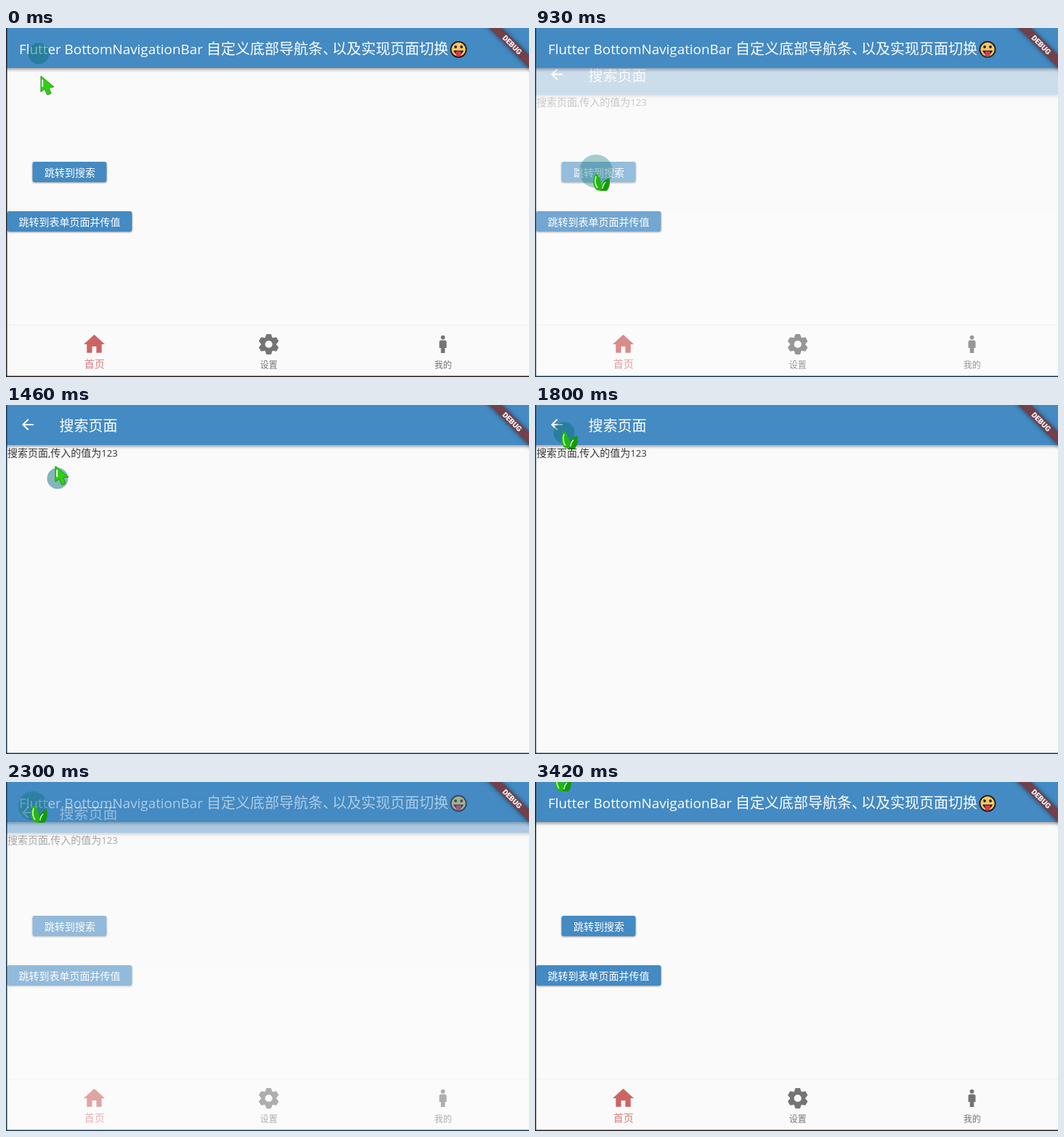
An HTML page that plays this animation: 720x480 px, repeating every 3.59 s.

```html
<!DOCTYPE html>
<html lang="zh-CN">
<head>
<meta charset="utf-8">
<style>
  html, body { margin: 0; width: 100%; height: 100%; overflow: hidden; background: #fafafa; }
  svg { display: block; width: 720px; height: 480px; }
  text { font-family: "Noto Sans CJK SC", "Noto Sans CJK", sans-serif; fill: #fff; white-space: pre; }
  .title { font-size: 20px; font-weight: 300; }
  .body { font-size: 14px; }
  .latin { font: 400 .943em "Open Sans", sans-serif; }
  .small { font-size: 12px; font-weight: 300; }
  .mid { text-anchor: middle; }
  .blue { fill: #448ac3; }
  .bar { filter: drop-shadow(0 2px 2px #0006); }
  .button { filter: drop-shadow(0 1.5px 1px #0006); }
  .gray { fill: #747474; }
  .red { fill: #cd6464; }
</style>
</head>
<body>
<svg viewBox="0 0 720 480">
  <rect width="720" height="480" fill="#fafafa"/>

  <g id="home">
    <rect class="blue bar" x="-9" y="-9" width="738" height="64"/>
    <text class="title" x="18" y="36"><tspan class="latin">Flutter BottomNavigationBar </tspan>自定义底部导航条、</text>
    <text class="title" x="449" y="36">以及实现页面切换</text>
    <g transform="translate(623 29.5)">
      <circle r="10.6" fill="#f8c660" stroke="#1c1c1c" stroke-width="1.8"/>
      <circle cx="-4" cy="-3.5" r="1.9" fill="#222"/>
      <circle cx="4" cy="-3.5" r="1.9" fill="#222"/>
      <path d="M-7 1.5H7Q5 7 0 7T-7 1.5" fill="#33191a"/>
      <path d="M-3.5 2.5h7v4a3.5 3.5 0 0 1-7 0z" fill="#e3344a"/>
    </g>

    <g class="button">
      <rect class="blue" x="36.5" y="184" width="102" height="28" rx="3"/>
      <rect id="glow" x="36.5" y="184" width="102" height="28" rx="3" fill="#fff"/>
    </g>
    <text class="body mid" x="88" y="203.7">跳转到搜索</text>
    <rect class="blue button" x="1.5" y="252" width="172" height="28" rx="3"/>
    <text class="body mid" x="87.5" y="271.7">跳转到表单页面并传值</text>

    <path d="M0 408.5H720" stroke="#eee"/>
    <path class="red" transform="translate(104 417.5) scale(1.458)" d="M10 20v-6h4v6h5v-8h3L12 3 2 12h3v8z"/>
    <text class="body mid" x="121.7" y="467" style="fill:#dc7c7c;font-weight:300">首页</text>
    <g id="gear" class="gray" transform="translate(361.7 435)">
      <circle r="7.7" fill="none" stroke="#747474" stroke-width="5.2"/>
    </g>
    <text class="small mid" x="361.7" y="468" style="fill:#747474">设置</text>
    <g class="gray">
      <circle cx="601.5" cy="425.6" r="2.9"/>
      <path d="M599 429.5h5q2.5 0 2.5 2.5v8h-2.2v7h-5.6v-7h-2.2v-8q0-2.5 2.5-2.5"/>
    </g>
    <text class="small mid" x="601.7" y="468" style="fill:#747474">我的</text>
  </g>

  <g id="search">
    <rect width="720" height="480" fill="#fafafa"/>
    <rect class="blue bar" width="738" height="55" x="-9"/>
    <path transform="translate(18 15)" fill="#fff" d="M20 11H7.83l5.59-5.59L12 4l-8 8 8 8 1.41-1.41L7.83 13H20z"/>
    <text class="title" x="73.5" y="36">搜索页面</text>
    <text class="body" x="2" y="70.5" style="fill:#333;font-weight:300">搜索页面<tspan class="latin">,</tspan>传入的值为<tspan class="latin">123</tspan></text>
  </g>

  <g transform="translate(720 0) rotate(45)">
    <rect x="-50" y="26.5" width="100" height="12.2" fill="#71404a" style="filter:drop-shadow(0 0 3px #0008)"/>
    <text class="mid" y="36.3" style="font:900 10.2px Roboto,sans-serif">DEBUG</text>
  </g>

  <path id="edge" d="M.75 0V479.25H720" fill="none" stroke-width="1.5"/>
  <circle id="ring" fill="#0c7276"/>
  <g id="arrow">
    <path d="M0 0V22L5 18 9 26 14 24 11 16 18 15Z" fill="#2fd012" stroke="#1a9a12" stroke-linejoin="round"/>
    <path d="M2.2 5V15" stroke="#e8ffe4" stroke-width="2"/>
  </g>
  <g id="hand">
    <path d="M22 8Q11 12 10 26H19Q25 18 22 8" fill="#149a08"/>
    <path d="M4 1Q-4 16 5 25L11 26Q15 14 4 1" fill="#22b80e"/>
    <path d="M4 6Q1 15 6 22M13 23Q13 18 17 14" fill="none" stroke="#d5f7cf" stroke-width="1.6"/>
  </g>
</svg>
<script>
const $ = id => document.getElementById(id);
const LOOP = 3590;

// time, pointer, pointer x and y, ring x, y and radius
const poses = [
  [0, 'arrow', 48, 66, 45, 35, 14.5],
  [190, 'arrow', 66, 125, 58, 96, 14.5],
  [360, 'hand', 80, 198, 84, 197, 14.5],
  [740, 'hand', 80, 198, 84, 197, 18],
  [930, 'hand', 80, 198, 84, 197, 23],
  [1120, 'hand', 80, 198, 84, 197, 14.5],
  [1290, 'arrow', 78, 190, 82, 197, 14.5],
  [1460, 'arrow', 68, 84, 71, 101, 14.5],
  [1630, 'arrow', 42, 46, 46, 52, 14.5],
  [1800, 'hand', 36, 34, 40, 38, 14.5],
  [1970, 'hand', 34, 30, 37, 33, 14.5],
  [2300, 'hand', 34, 30, 37, 33, 20],
  [2500, 'hand', 34, 30, 37, 33, 14.5],
  [2720, 'hand', 27, -13, 30, -20, 14.5],
  [3420, 'hand', 27, -13, 30, -20, 14.5]
];

for (let a = 0; a < 360; a += 60)
  $('gear').insertAdjacentHTML('beforeend',
    `<path d="M-5.2-8.5-3.2-14H3.2L5.2-8.5Z" transform="rotate(${a})"/>`);

function bezier(x1, y1, x2, y2, x) {
  const at = (a, b, s) => 3 * (1 - s) ** 2 * s * a + 3 * (1 - s) * s * s * b + s ** 3;
  let lo = 0, hi = 1;
  for (let i = 0; i < 24; i++) {
    const s = (lo + hi) / 2;
    if (at(x1, x2, s) < x) lo = s; else hi = s;
  }
  return at(y1, y2, lo);
}

const clamp = v => Math.min(1, Math.max(0, v));

function draw(now) {
  const time = now % LOOP;
  const [t, pointer, x, y, rx, ry, r] = poses.findLast(p => p[0] <= time);

  // The search page fades in while rising, and leaves the same way.
  const shown = clamp((t - 797) / 300) - clamp((t - 2180) / 300);
  const search = $('search');
  search.setAttribute('opacity', shown > 0 ? bezier(.42, 0, 1, 1, shown) : 0);
  search.setAttribute('transform', `translate(0 ${120 * (1 - bezier(.4, 0, .2, 1, shown))})`);

  $('glow').setAttribute('opacity', t < 360 || t > 1120 ? 0 : t < 740 ? .09 : t < 930 ? .18 : .25);
  $('edge').setAttribute('stroke', t >= 740 && t < 3420 ? '#17364f' : '#231f20');

  for (const id of ['arrow', 'hand']) $(id).setAttribute('display', id === pointer ? 'inline' : 'none');
  $(pointer).setAttribute('transform', `translate(${x} ${y})`);
  const ring = { cx: rx, cy: ry, r, opacity: .5 - (r - 14.5) * .018 };
  for (const key in ring) $('ring').setAttribute(key, ring[key]);

  requestAnimationFrame(() => draw(performance.now() - start));
}

const start = performance.now();
draw(0);
</script>
</body>
</html>
```
